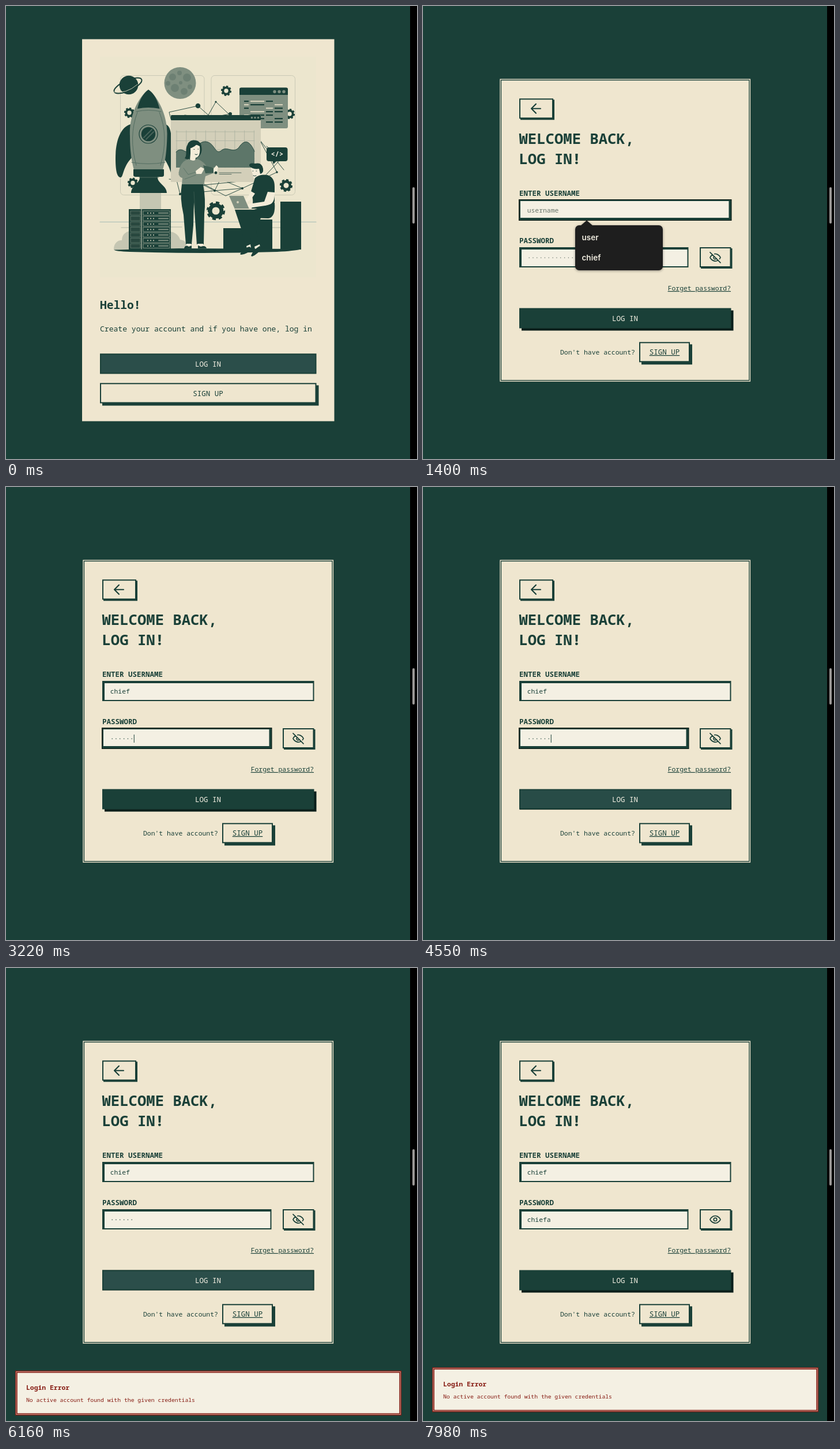
An HTML page that plays this animation: 713x785 px, repeating every 8 s.

```html
<!DOCTYPE html>
<html lang="en">
<head>
<meta charset="utf-8">
<title>Log in</title>
<style>
  html, body { margin: 0; width: 100%; height: 100%; overflow: hidden; background: #1a4038; }
  svg { display: block; width: 713px; height: 785px; }
  text { font-family: "Noto Sans Mono", "DejaVu Sans Mono", monospace; fill: #1a4038; white-space: pre; }
  .b { font-weight: 700; }
  .m { font-weight: 500; }
  .mid { text-anchor: middle; }
  .u { text-decoration: underline; }
  .light { fill: #f4f0e3; }
  .hint { fill: #68746a; }
  .red { fill: #861b12; }
  .menu { font-family: Inter, Roboto, sans-serif; font-weight: 600; fill: #efebdf; }
  .icon { fill: none; stroke: #1a4038; stroke-width: 1.9; stroke-linecap: round; stroke-linejoin: round; }
</style>
</head>
<body>
<svg id="stage" viewBox="0 0 713 785"></svg>
<script>
const DARK = '#1a4038', CREAM = '#efe6cf', PAPER = '#f4f0e3', GREY = '#7f8f80',
      PALE = '#c5c6b2', SKIN = '#f3ecd8', SHADE = '#0a1f1b', HOVER = '#2b4e4a';
const LOOP = 8000, TICK = 70;
const USER = 'chief', PASS = 'chiefa';

const rect = (x, y, w, h, fill, more = '') =>
  `<rect x="${x}" y="${y}" width="${w}" height="${h}" fill="${fill}" ${more}/>`;
const frame = (x, y, w, h, line, fill) =>
  rect(x + line / 2, y + line / 2, w - line, h - line, fill, `stroke="${DARK}" stroke-width="${line}"`);
const dot = (x, y, r, fill, more = '') => `<circle cx="${x}" cy="${y}" r="${r}" fill="${fill}" ${more}/>`;
const path = (d, fill, more = '') => `<path d="${d}" fill="${fill}" ${more}/>`;
const line = (d, color, w) => path(d, 'none', `stroke="${color}" stroke-width="${w}" stroke-linecap="round"`);
const text = (x, y, size, str, cls = '', more = '') =>
  `<text x="${x}" y="${y}" font-size="${size}" class="${cls}" ${more}>${str}</text>`;
const group = (id, body, more = '') => `<g id="${id}" ${more}>${body}</g>`;
const times = (n, fn) => Array.from({ length: n }, (_, i) => fn(i)).join('');

// Button with a hard shadow that can slide under it
const button = (id, x, y, w, h, off, face, shade) =>
  rect(x, y, w, h, shade, `id="${id}Shade" data-off="${off}" transform="translate(${off} ${off})"`) +
  frame(x, y, w, h, 2, face).replace('<rect', `<rect id="${id}Face"`);

// Input whose inset edge moves from top left to bottom right on focus
const field = (id, x, y, w, h) =>
  rect(x - 1, y - 1, w + 2, h + 2, '#07150f', `id="${id}Ring"`) +
  rect(x, y, w, h, DARK) +
  rect(x + 4, y + 4, w - 6, h - 6, PAPER, `id="${id}In"`);

const gear = (x, y, r) =>
  dot(x, y, r * .62, 'none', `stroke="${DARK}" stroke-width="${r * .42}"`) +
  dot(x, y, r * .88, 'none', `stroke="${DARK}" stroke-width="${r * .26}" pathLength="16" stroke-dasharray="1.1 .9"`);

function backdrop() {
  const card = x => rect(x, 120.5, 145.5, 207, 'none', 'rx="6" stroke="#cac9b5"');
  const code = [[413, 8], [424, 24], [451, 12], [466, 14]];
  return rect(163, 88, 375, 382, '#ece6ce') + card(198.5) + card(356) +
    line('M163 374.3H538', '#a5b9b2', 1.1) + line('M200 384H213M286 383H305M455 384H476', PALE, 1.3) +
    path('M-26 0a26 9 0 1 0 52 0a26 9 0 1 0-52 0', 'none',
      `transform="translate(211.500 138) rotate(-24)" stroke="${DARK}" stroke-width="2"`) +
    dot(213, 137, 16.3, DARK) + line('M187 149Q208 153 228 136', '#d7d5be', .9) +
    dot(302, 133.5, 27.5, GREY) +
    [[289, 123, 6], [301, 116, 4], [314, 124, 7], [293, 142, 7], [309, 148, 6], [281, 134, 4], [319, 140, 4], [303, 133, 3]]
      .map(([x, y, r]) => dot(x, y, r, '#6d8073')).join('') +
    [[382, 147, 9], [214, 185, 9], [492, 187, 9], [220, 306.500, 9], [486, 311, 11], [364, 355, 16]]
      .map(g => gear(...g)).join('') +
    line('M294 226L283 184L333 173L351 189L364 166L400 200L389 187L350 194L310 189M286 262L302 326L362 320L410 316L470 288L440 232L482 284M283 300L340 307L381 329L410 316L372 300L362 320L322 300L302 326L345 310L444 300L478 264L452 243', DARK, .9) +
    [[333, 173, 4.3], [389, 187, 3], [364, 166, 1.6], [470, 288, 1.8], [302, 326, 2], [362, 320, 2], [410, 316, 2]]
      .map(d => dot(...d, DARK)).join('') +
    rect(405, 141.500, 84, 70.500, GREY, 'rx="3"') + path('M405 154V144.500q0-3 3-3H486q3 0 3 3V154Z', DARK) +
    times(3, i => dot(466 + i * 8, 148.500, 2.7, GREY)) +
    times(7, r => code.map(([x, w], c) =>
      (r + c) % 4 == 3 ? '' : rect(x, 164 + r * 6, w, 2.2, (r + c) % 3 == 1 ? '#d3cfb9' : DARK)).join(''));
}

function board() {
  return path('M277 205Q287 208 287 235L288 296Q284 278 274 264Z', DARK) +
    rect(286, 189, 156, 116, '#d3cfb9') + rect(286, 189, 156, 9, DARK, 'rx="1.500"') +
    times(3, i => dot(426.500 + i * 5.5, 193.500, 1.7, GREY)) +
    line(times(9, i => `M${296 + i * 16.8} 216V280`) + times(4, i => `M295 ${218 + i * 15.5}H431`), '#aab0a0', .8) +
    path('M295 280V253Q301 246 309 251C325 260 331 234 346 235C362 236 362 258 373 251C383 241 394 257 404 245C414 230 423 233 431 252V280Z', '#5d7669') +
    line('M295 253Q301 246 309 251C325 260 331 234 346 235C362 236 362 258 373 251C383 241 394 257 404 245C414 230 423 233 431 252', DARK, .9) +
    line('M300 289H314M300 292H310M370 289H408M370 291.500H391', '#596f63', 1.1) +
    rect(452, 245, 36.5, 24, DARK, 'rx="4"') + path('M462 268L464 274L470 268Z', DARK) +
    text(470.3, 261.3, 12, '&lt;/&gt;', 'b mid light');
}

function rocket() {
  const rack = i => {
    const y = 355 + i * 9.5;
    return rect(216, y, 17, 7.5, '#29483f', `stroke="${GREY}" stroke-width=".6"`) +
      rect(238, y, 46, 7.5, DARK, `stroke="${GREY}" stroke-width="1"`) +
      times(3, k => dot(246 + k * 5, y + 3.8, 1.1, PALE)) +
      line(`M265 ${y + 3.8}H281`, GREY, 2);
  };
  return rect(232, 322, 37, 80, PALE) +
    path('M187 422a13 15 0 0 1 14-16a16 16 0 0 1 24-14H280a18 18 0 0 1 22 13a13 13 0 0 1 12 17Z', PALE) +
    path('M216 205C198 210 190 235 190 264C190 287 193 297 199 297C204 296 202 280 218 263Z', DARK) +
    path('M247 145C263 156 281 190 279.500 225C279 255 275 273 272 284H222C219 273 215 255 215 225C213 190 231 156 247 145Z', GREY) +
    path('M247 145C257 151 263 164 266.500 178Q247 174 228 178C231 164 238 151 247 145Z', DARK) +
    line('M226 183Q247 178 269 183M218 271Q247 276 276 271M228 184Q212 226 226 276M266 184Q283 226 268 276', '#536d61', 1) +
    dot(247, 222, 16, GREY, `stroke="${DARK}" stroke-width="1.2"`) + dot(247, 222, 12.3, DARK) +
    line('M239 228L253 214M243 231L256 218', '#486359', 2) +
    path('M221 283H274V293Q274 296 270 296H225Q221 296 221 293Z', DARK) +
    path('M232 296H263C262 307 279 311 279 324H217C217 311 233 307 232 296Z', DARK) +
    line('M231 297H265', '#506b5f', 1) +
    rect(213, 352, 73, 70, DARK) + rect(234, 352, 2, 70, GREY) + times(7, rack);
}

function people() {
  return path('M187 422.500L300 420L512 421Q505 424 470 426Q340 430 215 426Q190 425 187 422.500Z', DARK) +
    rect(377, 385, 44, 38, DARK) + rect(420, 370, 42, 53, DARK) + rect(476, 339, 36, 83, DARK) +
    // woman
    path('M315 240C318 229 338 230 339 243C342 257 333 267 318 267L310 264C315 258 310 248 315 240Z', DARK) +
    path('M320 242Q329 238 336 243Q338 262 329 263L328 268H319L320 255Z', SKIN) +
    path('M317 247Q329 245 334 235L322 233Z', DARK) +
    line('M326 248.500h.8M333 248h.8M328 257q2 1.500 4 0', DARK, 1) +
    path('M317 265Q325 271 332 265Q345 270 351 283L363 281L364 288L346 295L343 310H305L306 298Q296 296 302 279Q306 268 317 265Z', GREY) +
    path('M342 276L362 281L364 289L346 290Z', '#3e5e52') +
    line('M308 281L316 292L332 287M310 300L329 293', '#5d7669', 1) +
    path('M329 286L338 279L344 282L339 291L330 291ZM360 282L365 276L368 279L366 288L360 289Z', SKIN) +
    dot(364, 289, 2.4, DARK) +
    path('M305 309H342Q347 336 344 360L343 413H331L326 340L325 380L322 413H312L308 362Q301 332 305 309Z', DARK) +
    line('M326 322L328 355', '#3e5e52', .8) +
    path('M313 412H321L321 416H312ZM332 412H342L342 416H333Z', SKIN) +
    path('M309 420Q311 413 317 417L322 415V420ZM333 415L338 417Q346 414 348 420H333Z', DARK) +
    // man
    path('M425 282Q427 275 443 278L446 289L440 301L430 299Z', SKIN) +
    path('M422 277Q421 271 432 273Q444 270 446 282Q447 290 441 291L439 282Q428 284 422 277Z', DARK) +
    line('M428 286h.8M434 286h.8M429 294q3 1.500 5 0', DARK, 1) +
    path('M432 298Q440 291 454 293Q466 297 466 313V338L462 354H425Q432 335 424 325Z', DARK) +
    path('M454 322L466 323Q467 341 456 345L422 350L418 347L421 343L448 339ZM425 321L432 325L425 335L414 343L410 339L419 332Z', SKIN) +
    path('M387 329H412L422 352H397Z', GREY) + dot(402, 340, 2, '#d3cfb9') +
    path('M397 351H440V353H397Z', '#d3cfb9') +
    path('M397 353H430L466 341Q468 366 455 368L425 367L422 386L425 416L416 419L408 386Z', DARK) +
    path('M420 362L442 367L434 392L441 414L430 418L419 390Z', DARK) +
    path('M417 416L424 413L425 419L418 421ZM431 417L440 413L441 418L432 421Z', SKIN) +
    path('M406 430Q411 420 422 417L427 420Q419 430 408 431ZM425 433Q429 422 440 416L444 419Q437 430 427 434Z', DARK);
}

const landing = rect(132, 57.5, 437.5, 662, CREAM) + backdrop() + board() + rocket() + people() +
  text(163, 525, 19.6, 'Hello!', 'b') +
  text(163, 564, 13.05, 'Create your account and if you have one, log in') +
  frame(163, 602.3, 375.500, 35.2, 2, HOVER) + text(350.5, 624.5, 12.5, 'LOG IN', 'm mid light') +
  button('join', 163, 653.3, 375.5, 35.2, 4, CREAM, DARK) + text(350.5, 675.5, 12.5, 'SIGN UP', 'mid');

const login = rect(133.300, 126.3, 434.8, 524.6, CREAM) +
  rect(135.4, 128.4, 430.6, 520.4, 'none', `stroke="${DARK}" stroke-width="1.4"`) +
  button('back', 167, 160.300, 59, 35, 2, CREAM, DARK) +
  path('m12 19-7-7 7-7M19 12H5', 'none', 'class="icon" transform="translate(182.300 164.100) scale(1.14)"') +
  text(166.500, 238.500, 25.6, 'WELCOME BACK,', 'b') + text(166.500, 273.500, 25.6, 'LOG IN!', 'b') +
  text(167, 329, 12.5, 'ENTER USERNAME', 'b') + field('user', 167, 336, 367.500, 35) +
  text(180.7, 358, 11.4, 'username', 'hint', 'id="userText"') +
  text(167, 411, 12.5, 'PASSWORD', 'b') + field('pass', 167, 418, 293.500, 35) +
  text(180.7, 440, 11.4, '', 'hint', 'id="passText"') +
  rect(0, 0, 1, 14, DARK, 'id="caret"') +
  button('eye', 480, 418, 54.500, 35, 2, CREAM, DARK) +
  `<g class="icon" transform="translate(496.200 425) scale(.9)">` +
    group('open', '<path d="M2 12s3-7 10-7 10 7 10 7-3 7-10 7-10-7-10-7Z"/><circle cx="12" cy="12" r="3"/>') +
    group('shut', '<path d="M9.9 9.9a3 3 0 1 0 4.2 4.2M10.7 5.1A10.4 10.4 0 0 1 12 5c7 0 10 7 10 7a13.2 13.2 0 0 1-1.7 2.700M6.600 6.600A13.500 13.500 0 0 0 2 12s3 7 10 7a9.700 9.700 0 0 0 5.400-1.600M2 2l20 20"/>') +
  '</g>' +
  text(534, 493, 11.4, 'Forget password?', 'u', 'text-anchor="end"') +
  button('go', 167, 523.500, 367.500, 35, 4, DARK, SHADE) + text(350.5, 545.5, 12.5, 'LOG IN', 'm mid light') +
  text(238, 604, 11.4, "Don't have account?") +
  button('new', 375, 582.300, 88, 35, 4, CREAM, DARK) + text(419, 604, 12.5, 'SIGN UP', 'mid u') +
  group('menu', path('M273 381L284 371.500L295 381Z', '#1e1e1e') + rect(264, 380, 152, 78, '#1e1e1e', 'rx="7"') +
    text(275.5, 406, 13.5, 'user', 'menu') + text(275.5, 441, 13.5, USER, 'menu'),
    'style="filter:drop-shadow(0 1px 2px #0006)"') +
  group('toast', rect(16, 692, 670, 77.5, '#861b12') + rect(17.500, 693.500, 667, 74.500, PAPER) +
    rect(18.9, 694.9, 664.2, 71.7, PAPER, 'stroke="#861b12" stroke-width="1.6"') +
    text(35, 725, 11.4, 'Login Error', 'b red') +
    text(35, 746, 9.78, 'No active account found with the given credentials', 'red'));

document.getElementById('stage').innerHTML = rect(0, 0, 713, 785, DARK) +
  group('landing', landing) + group('login', login) +
  rect(701, 0, 12, 785, '#000') + rect(705, 314, 4, 63, '#9b9896', 'rx="2"');

const $ = id => document.getElementById(id);

// Tables of [time, value], joined by straight ramps
const moves = {
  user: [[770, 0], [980, 1], [1750, 1], [2240, 0]],
  pass: [[1750, 0], [2240, 1], [5530, 1], [5740, 0]],
  menu: [[840, 0], [910, 1], [1470, 1], [1680, 0]],
  go: [[3850, 0], [4060, 1], [4130, 1], [4270, 0], [4410, 0], [4550, .85], [4620, 1],
       [4970, 1], [5110, 0], [5250, 0], [5390, 1], [6860, 1], [7070, 0]],
  eye: [[4060, 0], [4270, 1], [4410, 1], [4550, 0], [6860, 0], [7070, 1], [7840, 1], [7980, 0]]
};
const keys = [2450, 2520, 2590, 2660, 2730, 3220];
const blinks = [[840, 1400], [1540, 1820], [1820, 3710], [4200, 4760], [5320, 5600]];

function at(steps, t) {
  const i = steps.findIndex(s => s[0] > t);
  if (i < 0) return steps[steps.length - 1][1];
  if (i == 0) return steps[0][1];
  const [a, from] = steps[i - 1], [b, to] = steps[i];
  return from + (to - from) * (t - a) / (b - a);
}
const show = (id, on) => { $(id).style.display = on ? '' : 'none'; };
function write(id, str, hint) {
  $(id).textContent = str;
  $(id).setAttribute('class', hint ? 'hint' : '');
}
function focus(id, p) {
  $(id + 'In').setAttribute('transform', `translate(${-2 * p} ${-2 * p})`);
  $(id + 'Ring').style.opacity = p;
}
function hover(id, p, base, lit) {
  const shade = $(id + 'Shade'), off = shade.dataset.off * (1 - p);
  shade.setAttribute('transform', `translate(${off} ${off})`);
  $(id + 'Face').style.fill = `color-mix(in srgb, ${lit} ${p * 100}%, ${base})`;
}

function draw(t) {
  show('landing', t < 140);
  show('login', t >= 140);
  focus('user', at(moves.user, t));
  focus('pass', at(moves.pass, t));
  hover('go', at(moves.go, t), DARK, HOVER);
  hover('eye', at(moves.eye, t), CREAM, PAPER);
  $('menu').style.opacity = at(moves.menu, t);

  const filled = t >= 1540, plain = t >= 7560;
  const typed = keys.filter(k => k <= t).length;
  write('userText', filled ? USER : 'username', !filled);
  write('passText', plain ? PASS : '·'.repeat(typed || 14), !typed);
  show('open', plain);
  show('shut', !plain);

  const inPass = t >= 1820, count = inPass ? typed : filled ? USER.length : 0;
  $('caret').setAttribute('x', 180.7 + count * 6.84);
  $('caret').setAttribute('y', inPass ? 429 : 347);
  show('caret', blinks.some(([on, off]) => t >= on && t < off));

  const rise = Math.min(1, Math.max(0, (t - 6040) / 240));
  show('toast', rise > 0);
  $('toast').setAttribute('transform', `translate(0 ${93 * (1 - rise) ** 4})`);
}

const start = performance.now();
function loop() {
  const t = (performance.now() - start) % LOOP;
  draw(Math.floor(t / TICK) * TICK);
  requestAnimationFrame(loop);
}
loop();
</script>
</body>
</html>
```
